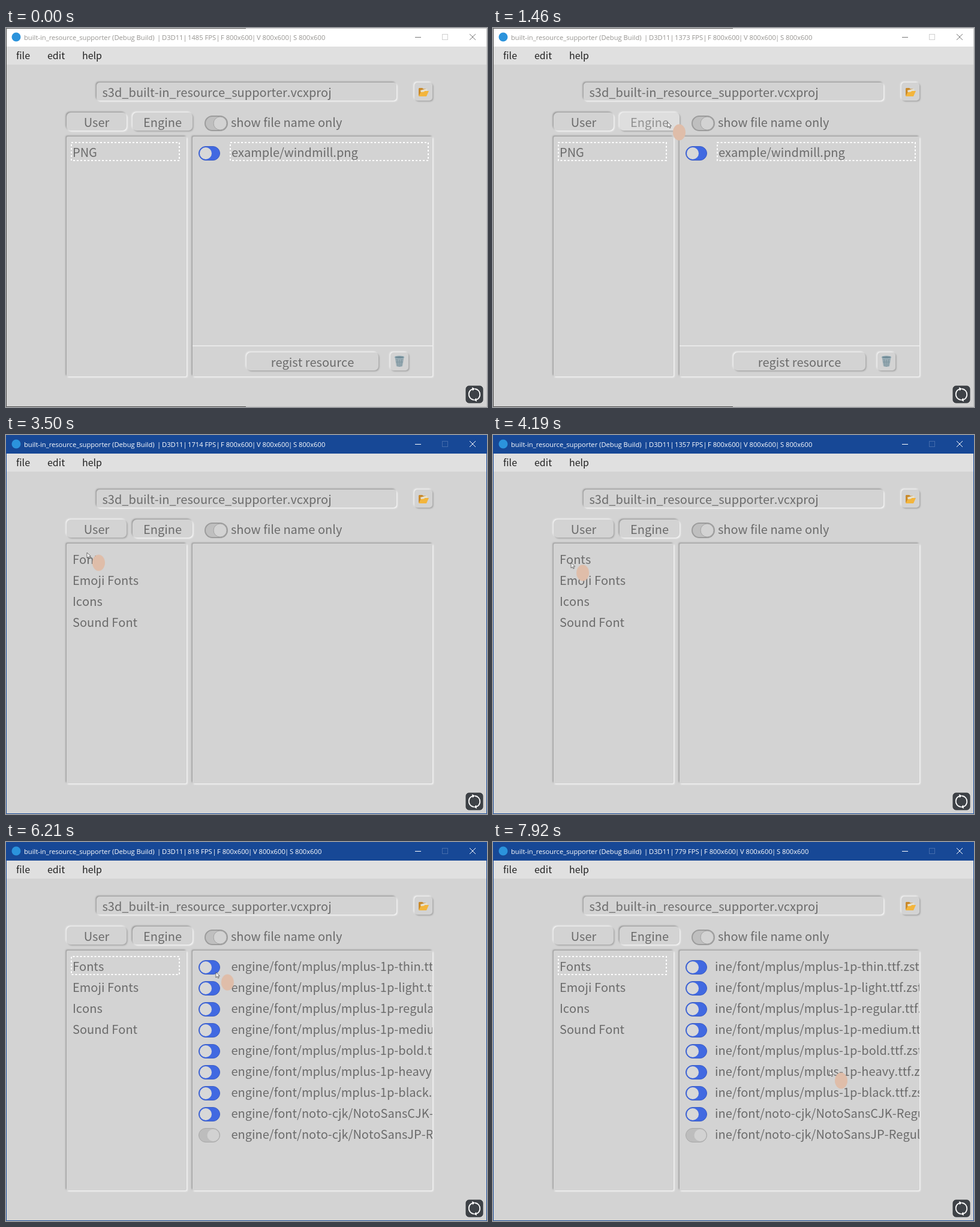
Recreate the animation shown at these times as an HTML page. Size 802x632 px, loop 7990 ms.

```html
<!DOCTYPE html>
<html lang="en">
<head>
<meta charset="utf-8">
<title>Resource supporter</title>
<style>
  html, body { margin: 0; width: 100%; height: 100%; overflow: hidden; background: #d3d3d3; }
  svg { display: block; width: 100vw; height: 100vh; animation: focus 7990ms step-end infinite; }
  text { font: 20px "Noto Sans CJK JP", "Noto Sans CJK", sans-serif; font-kerning: none; fill: #6b6b6b; white-space: pre; }
  .menu text { font-size: 16px; fill: #222; }
  .title text { font: 11.2px "Open Sans", sans-serif; fill: var(--ink); }
  .mid { text-anchor: middle; }
  .dash { fill: none; stroke: #fff; stroke-width: 2; stroke-dasharray: 3 3; animation: march 500ms linear infinite; }
  .user { animation: leave 7990ms step-end infinite; }
  .engine { animation: arrive 7990ms step-end infinite; }
  .fonts { animation: select 7990ms step-end infinite; }
  .hover { fill: #fff; animation: hover 7990ms step-end infinite; }
  .scroll { animation: scroll 7990ms linear infinite; }
  .cursor { animation: move 7990ms linear infinite; }

  @keyframes focus {
    0% { --bar: #fff; --ink: #969490; --close: #777; --max: #d0d0d0; --edge: #484848; --edge-right: #c4c4c4; }
    21.65%, 100% { --bar: #174896; --ink: #fff; --close: #fff; --max: #456cab; --edge: #174896; --edge-right: #174896; }
  }
  @keyframes march { to { stroke-dashoffset: -6px; } }
  @keyframes leave { 0% { visibility: visible; } 23.4%, 100% { visibility: hidden; } }
  @keyframes arrive { 0% { visibility: hidden; } 23.4%, 100% { visibility: visible; } }
  @keyframes select { 0% { visibility: hidden; } 54.4%, 100% { visibility: visible; } }
  @keyframes hover { 0% { opacity: 0; } 14.5% { opacity: .25; } 34.7%, 100% { opacity: 0; } }
  @keyframes scroll { 0%, 94% { transform: translate(0, 0); } 99%, 100% { transform: translate(-40px, 0); } }
  @keyframes move {
    0% { transform: translate(690px, 640px); }
    1.9% { transform: translate(670px, 610px); }
    6.3% { transform: translate(520px, 400px); }
    10.5% { transform: translate(350px, 226px); }
    12.5% { transform: translate(312px, 188px); }
    16.3%, 21.7% { transform: translate(291px, 157px); }
    29.4%, 33.7% { transform: translate(306px, 163px); }
    37.5% { transform: translate(215px, 200px); }
    41.2% { transform: translate(131px, 219px); }
    43.8% { transform: translate(135px, 196px); }
    47.6% { transform: translate(127px, 212px); }
    51.6% { transform: translate(128px, 213px); }
    56.3% { transform: translate(140px, 212px); }
    61.2% { transform: translate(206px, 209px); }
    63% { transform: translate(218px, 210px); }
    71.3%, 77.7% { transform: translate(348px, 217px); }
    82.6% { transform: translate(610px, 226px); }
    86.4% { transform: translate(618px, 290px); }
    91.4% { transform: translate(562px, 378px); }
    93.1%, 100% { transform: translate(561px, 381px); }
  }
</style>
</head>
<body>
<svg id="stage" viewBox="0 0 802 632"></svg>
<script>
const LOOP = 7990;
const stage = document.getElementById('stage');

const label = (x, y, text, cls = '') => `<text x="${x}" y="${y}" class="${cls}">${text}</text>`;

// Soft bevel: dark and light copies shifted in opposite directions below the face
function bevel(x, y, w, h, r, raised) {
  const rect = (d, fill, extra = '') =>
    `<rect x="${x + d}" y="${y + d}" width="${w}" height="${h}" rx="${r}" fill="${fill}" ${extra}/>`;
  const [before, after] = raised ? ['#f4f4f4', '#a4a4a4'] : ['#989898', '#f8f8f8'];
  const soft = 'filter="url(#soft)"';
  return rect(-1.5, before, soft) + rect(1.5, after, soft) + rect(0, '#d3d3d3');
}

function button(x, y, w, text, raised) {
  return bevel(x, y, w, 30, 7, raised) + label(x + w / 2, y + 24, text, 'mid');
}

function toggle(x, y, on) {
  const [pill, line, knob] = on ? ['#4169e1', '#3a5cc4', '#d8d8d8'] : ['#bdbdbd', '#a8a8a8', '#d2d2d2'];
  return `<rect x="${x + .5}" y="${y + .5}" width="35" height="23" rx="11.5" fill="${pill}" stroke="${line}"/>
    <circle cx="${x + (on ? 12 : 24.5)}" cy="${y + 12}" r="10" fill="${knob}"/>`;
}

const dashed = (x, w) => `<rect class="dash" x="${x}" y="191" width="${w}" height="30"/>`;

const categories = ['Fonts', 'Emoji Fonts', 'Icons', 'Sound Font'];
const weights = ['thin', 'light', 'regular', 'medium', 'bold', 'heavy', 'black'];
const files = [
  ...weights.map(w => `mplus/mplus-1p-${w}.ttf`),
  'noto-cjk/NotoSansCJK-Regular.ttc',
  'noto-cjk/NotoSansJP-Regular.otf'
].map(path => `engine/font/${path}.zstdcmp`);
const rowY = i => 215 + 35 * i;

const titleBar = `
  <rect width="802" height="31" fill="var(--bar)"/>
  <circle cx="17" cy="15" r="7.5" fill="#2b93dc"/>
  <g class="title">
    ${label(30, 20, 'built-in_resource_supporter (Debug Build)')}
    ${label(252, 20, '|')}${label(260, 20, 'D3D11')}${label(295.5, 20, '|')}
    <text id="fps" x="303" y="20"></text>
    <g id="sizes">
      ${label(350.5, 20, '|')}${label(358, 20, 'F 800x600')}
      ${label(410, 20, '|')}${label(418, 20, 'V 800x600')}
      ${label(471, 20, '|')}${label(479, 20, 'S 800x600')}
    </g>
  </g>
  <g fill="none" stroke="var(--close)">
    <path d="M682 15.5h10M773 10l10 10M783 10l-10 10"/>
    <rect x="727.5" y="10.5" width="9" height="9" stroke="var(--max)"/>
  </g>`;

const menuBar = `
  <g class="menu">
    <rect y="31" width="802" height="30" fill="#e0e0e0"/>
    ${label(17, 52, 'file')}${label(69, 52, 'edit')}${label(127, 52, 'help')}
  </g>`;

const folder = `
  <path d="M688 113V101l1-1h5l2 1.500h5v3z" fill="#c98a2c"/>
  <path d="M691 104l11-3 .5 4-10 5z" fill="#e6e2d2"/>
  <path d="M688 114l3.500-7 5-.5 2-1.500h6.500l-4 9z" fill="#f3b53c"/>`;

const trash = `
  <path d="M648.500 549l2.500 15q5 2 10 0l2.500-15z" fill="#98abb3"/>
  <path d="M652 552l1.500 12M656 553v12M660 552l-1.500 12M650 557h12" stroke="#7f959f" fill="none"/>
  <ellipse cx="656" cy="549" rx="8" ry="2" fill="#6c8793" stroke="#9db4be"/>`;

const reload = `
  <rect x="767" y="597" width="28" height="28" rx="5" fill="#3e4247" stroke="#2e3236"/>
  <circle cx="781" cy="611" r="9.300" fill="none" stroke="#fff" stroke-width="1.800"
    stroke-dasharray="26 3.200" transform="rotate(-85 781 611)"/>
  <path d="M777 599l5 2.500-4 3.500zM785 623l-5-2.500 4-3.500z" fill="#fff"/>`;

const userPage = `
  <g class="user">
    ${button(101, 141, 100, 'User', false)}${button(211, 141, 100, 'Engine', true)}
    ${dashed(109, 180)}${label(111, 215, 'PNG')}
    ${toggle(321, 197, true)}${dashed(374, 330)}${label(376, 215, 'example/windmill.png')}
    <path d="M311 530h400" stroke="#e8e8e8" stroke-width="2"/>
    ${button(401, 541, 220, 'regist resource', true)}
    ${bevel(641, 541, 30, 30, 5, true)}${trash}
  </g>`;

const enginePage = `
  <g class="engine">
    ${button(101, 141, 100, 'User', true)}${button(211, 141, 100, 'Engine', false)}
    ${categories.map((name, i) => label(111, rowY(i), name)).join('')}
  </g>
  <g class="fonts">
    ${dashed(109, 180)}
    ${files.map((_, i) => toggle(321, rowY(i) - 18, i < 8)).join('')}
    <g clip-path="url(#names)"><g class="scroll">
      ${files.map((name, i) => label(375.5, rowY(i), name)).join('')}
    </g></g>
  </g>`;

stage.innerHTML = `
  <defs>
    <filter id="soft" x="-10%" y="-20%" width="120%" height="140%"><feGaussianBlur stdDeviation=".8"/></filter>
    <clipPath id="names"><rect x="371" y="181" width="340" height="400"/></clipPath>
  </defs>
  <rect width="802" height="632" fill="#d3d3d3"/>
  ${titleBar}${menuBar}
  ${bevel(151, 91, 500, 30, 5, false)}${label(160.5, 115, 's3d_built-in_resource_supporter.vcxproj')}
  ${bevel(681, 91, 30, 30, 5, true)}${folder}
  <rect x="332" y="147" width="37" height="24" rx="12" fill="#bfbfbf" stroke="#9c9c9c" stroke-width="2"/>
  <circle cx="357" cy="159" r="11" fill="#d3d3d3" stroke="#a4a4a4"/>
  ${label(375, 165, 'show file name only')}
  ${bevel(101, 181, 200, 400, 2, false)}${bevel(311, 181, 400, 400, 2, false)}
  ${userPage}${enginePage}
  <rect class="hover" x="211" y="141" width="100" height="30" rx="7"/>
  ${reload}
  <path d="M400 .5H.5v631H400" fill="none" stroke="var(--edge)"/>
  <path d="M400 .5h401.500v631H400" fill="none" stroke="var(--edge-right)"/>
  <g class="cursor">
    <ellipse cx="19.500" cy="17" rx="10.500" ry="13.500" fill="#dfbda9"/>
    <path d="M0 0v9l2.200-2 1.500 3 1.500-.7-1.400-3H6.500z" fill="#fff" stroke="#444" stroke-width=".8"/>
  </g>`;

const fps = document.getElementById('fps');
const sizes = document.getElementById('sizes');
const rates = [1485, 1373, 1437, 1714, 1357, 1046, 818, 779];

function tick(now) {
  const time = now % LOOP;
  const step = time < 840 ? 0 : Math.min(7, 1 + Math.floor((time - 840) / 1018));
  const rate = rates[step];
  fps.textContent = `${rate} FPS`;
  sizes.setAttribute('transform', `translate(${rate < 1000 ? -6 : 0} 0)`);
  requestAnimationFrame(tick);
}
tick(0);
</script>
</body>
</html>
```
